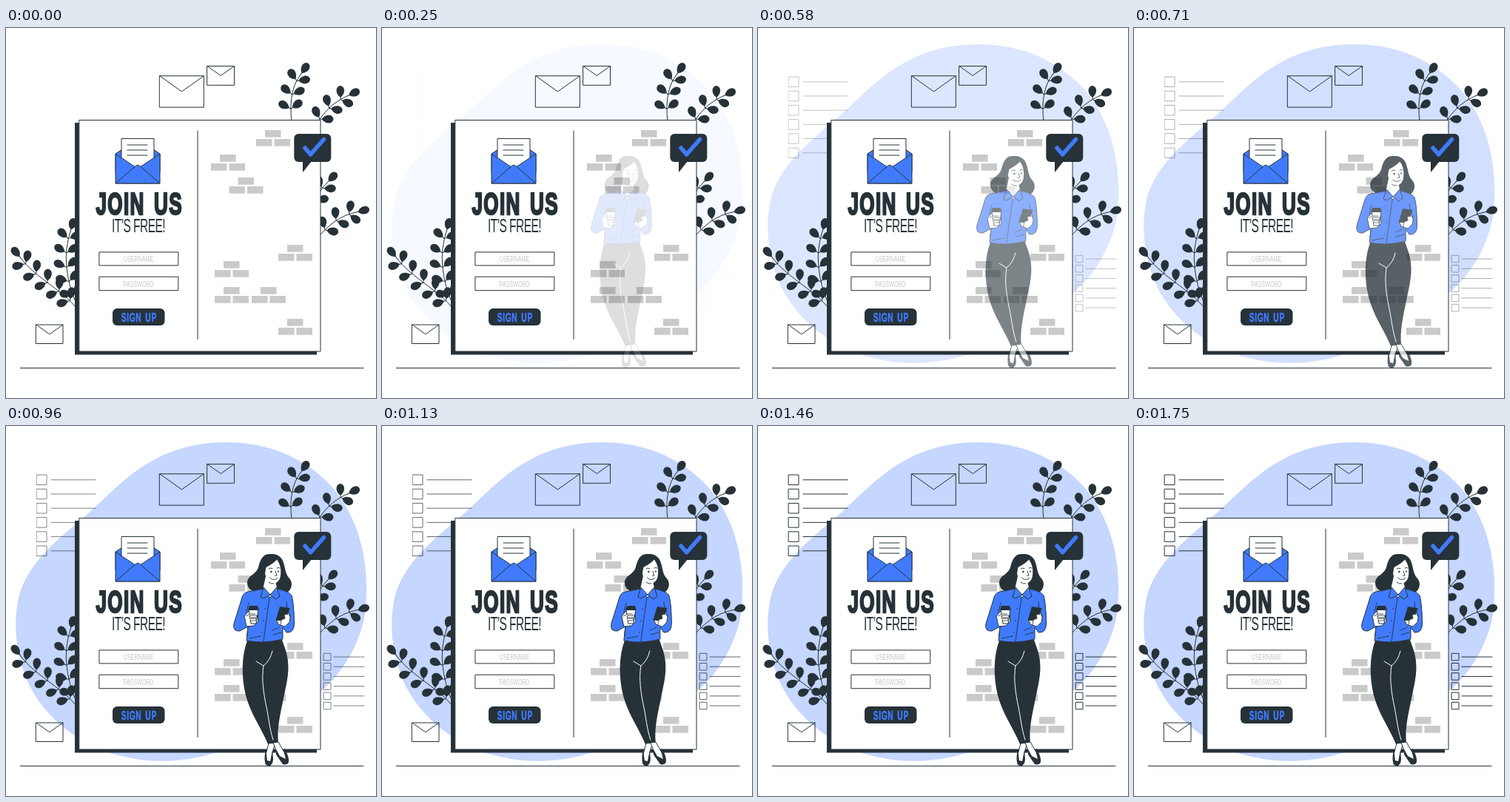
These frames come from a looping animation (500x500 px, 1790 ms). An HTML page:

```html
<!DOCTYPE html>
<html lang="en">
<head>
<meta charset="utf-8">
<title>Join us</title>
<style>
html, body { margin: 0; width: 100%; height: 100%; overflow: hidden; background: #fff; }
svg { display: block; width: 100%; height: 100%; }
.line { fill: none; stroke: #263238; stroke-linejoin: round; stroke-linecap: round; }
.edge { stroke: #263238; stroke-linejoin: round; }
.dark { fill: #263238; }
.blue { fill: #407bff; }
.white { fill: #fff; }
.brick { fill: #cacaca; }
.crease { fill: none; stroke: #fff; stroke-linecap: round; }
text { font-family: "Liberation Sans", Arial, sans-serif; text-anchor: middle; }
.bold { font-weight: 700; word-spacing: .14em; }
</style>
</head>
<body>
<svg viewBox="0 0 500 500">
  <path id="blob" fill="#c5d6ff" d="M298 22C380 22 445 67 470 130C487 170 490 215 485 255C477 300 450 340 422 361C390 387 340 416 300 435C265 450 215 458 170 449C105 438 52 396 29 345C14 308 9 270 17 232C28 187 68 155 102 126C147 90 190 22 298 22Z"/>
  <g id="lists" class="line"></g>
  <g id="plants"></g>
  <g id="mail" class="line"></g>
  <path class="line" d="M19.5 459.5H483"/>

  <path class="dark" d="M93 128H420V441.5H93Z"/>
  <path class="white edge" d="M98.8 124.5H425V437H98.8Z"/>
  <path class="line" d="M259 139V420.5"/>
  <g id="bricks" class="brick"></g>

  <g class="edge">
    <path class="blue" d="M148 170L178 150L208 170V195H148Z"/>
    <path class="white" d="M156 149.5H200V195H156Z"/>
    <path class="line" d="M164 158H191M164 165H191M164 172H191"/>
    <path class="blue" d="M148 170L178 190L208 170V210H148Z"/>
    <path class="blue" d="M148 210L174.5 187Q178 183.5 181.5 187L208 210Z"/>
  </g>

  <g class="white edge">
    <path d="M125.9 302.9H232.8V320.9H125.9Z"/>
    <path d="M125.9 336.2H232.8V354.7H125.9Z"/>
  </g>
  <rect class="dark" x="144" y="379" width="70.5" height="23" rx="6"/>
  <!-- one narrow face for all lettering -->
  <g id="words"></g>

  <g id="woman">
    <path class="dark" d="M357 173C347 172 343 182 341 191C338 201 326 202 326 212C326 221 336 227 347 222L378 226C387 222 388 211 383 206C376 199 378 189 373 180C369 174 363 172.500 357 173Z"/>
    <path class="white" d="M351 203L347 221L357 233L367 222L364 210Z"/>
    <path class="white" d="M351.5 191C355 189 361 186 366 180.500C371 187 372 195 371 202C370 209 366 212.500 362 212.300C355 211 351 206 350 199Z"/>
    <path class="line" stroke-width=".9" d="M355 193Q357 191 360 192.500M366 192Q368 190.500 370 192M364 196L366 202L363.500 202.500M356.500 205Q361 210 367 205.500M355 211Q358 214 362 213"/>
    <circle class="dark" cx="358.5" cy="197" r="1.2"/>
    <circle class="dark" cx="368" cy="196.5" r="1.1"/>

    <path class="dark" d="M326 290C318 311 318 340 324 364C330 388 345 408 354 430L368 428C366 411 370 392 374 373C378 352 383 336 381 318C380 306 376 298 373 289Z"/>
    <path class="crease" d="M360 304Q357 317 348 324L338 318M348 324C345 342 348 361 352 380C355 394 356 409 361 424"/>

    <path class="blue edge" d="M347 220L327 224Q320 225 318 235L308 267Q306 278 316 277L327 271L325 290Q348 295 374 288L374 272L379 279Q390 280 389.500 265Q389 239 386 229Q382 223 367 220L357 232Z"/>
    <path class="blue edge" d="M348 218L344 231L348 233L357 228ZM366 218L370 230L365 234L357 228Z"/>
    <path class="line" stroke-width=".9" d="M356 232Q352 260 348 291M328 239L325 252M327 271L326 283M379 238L380 246M329 287L344 284M361 282L372 279M369 272L360 276"/>
    <g class="dark"><circle cx="350" cy="247" r=".8"/><circle cx="348" cy="263" r=".8"/><circle cx="346" cy="279" r=".8"/></g>

    <path class="white edge" d="M322 257L328 250L340 252L341 264L335 270L325 271Z"/>
    <path class="white edge" d="M328 248H341L338 267H331Z"/>
    <path class="dark" d="M327.5 247L329 243H340L341.500 247V249H327.500Z"/>
    <path class="white edge" stroke-width=".8" d="M324 257L330 254L337 254M330 256H339V259H331M330 260H338V263H331"/>
    <path class="white edge" d="M365 261L371 254L382 251L384 257L383 265L377 271L368 268Z"/>
    <path class="dark" d="M370 244L383.500 246L378 264L364.500 262.500Z"/>
    <path class="white edge" stroke-width=".8" d="M376 255L382 254L384 258L383 265L377 271L371 269L372 262L377 260Z"/>

    <path class="white edge" d="M355 429L351 444L352 457L358 455L360 441L364 428Z"/>
    <path class="dark" d="M351 437Q348 451 351 458L356 459.500Q361 457 361 450L360 439L357 453L353 452Z"/>
    <path class="white edge" d="M361 428L366 441L374 455L380 454L376 441L368 427Z"/>
    <path class="dark" d="M376 435Q383 447 382 454Q380 459 374 457L365 444V437L370 446L378 450Z"/>
  </g>

  <path class="dark" d="M401 179V195L413 180Z"/>
  <rect class="dark" x="389.3" y="143" width="50" height="38" rx="6"/>
  <path fill="none" stroke="#407bff" stroke-width="5.5" stroke-linecap="round" stroke-linejoin="round" d="M404 162L411.500 171L429.500 150.500"/>
</svg>
<script>
const $ = id => document.getElementById(id);
const add = (id, tag, attrs) => {
  const el = document.createElementNS('http://www.w3.org/2000/svg', tag);
  for (const k in attrs) el.setAttribute(k, attrs[k]);
  return $(id).appendChild(el);
};

function list(x, y, size, step, from, to) {
  for (let i = 0; i < 6; i++) {
    const top = y + i * step;
    add('lists', 'path', { d: `M${x} ${top}h${size}v${size}h${-size}zM${from} ${top + size / 2}H${to}` });
  }
}
list(41.5, 66, 13.5, 19.2, 61, 121);
list(429.5, 307.3, 9.5, 13.2, 443, 484);

for (const [x, y, w, h] of [[207.7, 64.7, 59.6, 42.4], [272, 51.5, 36.5, 25.8], [40.7, 401, 36.3, 25.5]])
  add('mail', 'path', { d: `M${x} ${y}h${w}v${h}h${-w}zl${w / 2} ${h / 2}l${w / 2} ${-h / 2}` });

for (const [x, y] of [[338, 138], [277, 171], [301.5, 202], [368, 293], [282, 315], [282, 350], [332, 350], [368, 393]])
  for (const [dx, dy] of [[12, 0], [0, 12], [24.5, 12]])
    add('bricks', 'rect', { x: x + dx, y: y + dy, width: 21.5, height: 9.7 });

function word(label, x, y, size, color, spacing = 0, weight = 0) {
  const el = add('words', 'text', {
    transform: `translate(${x} ${y}) scale(.62 1)`, 'font-size': size, fill: color,
    'letter-spacing': spacing, stroke: weight ? color : 'none', 'stroke-width': weight
  });
  if (weight) el.setAttribute('class', 'bold');
  el.textContent = label;
}
word('JOIN US', 180.2, 251.8, 42, '#263238', 2.2, 2.6);
word('IT’S FREE!', 179, 275.6, 25, '#263238', -.9);
word('USERNAME', 179, 316.3, 11.5, '#c7c7c7');
word('PASSWORD', 179, 349.6, 11.5, '#c7c7c7');
word('SIGN UP', 179.8, 396.6, 16.5, '#407bff', 1.1, .6);

// Stem with a leaf at the tip and pairs below it
function branch(d) {
  const stem = add('plants', 'path', { d, class: 'line' }), length = stem.getTotalLength();
  const leaf = (s, turn) => {
    const p = stem.getPointAtLength(s), q = stem.getPointAtLength(s - 1);
    const angle = Math.atan2(p.y - q.y, p.x - q.x) * 180 / Math.PI + turn;
    add('plants', 'path', {
      class: 'dark', transform: `translate(${p.x} ${p.y}) rotate(${angle})`,
      d: 'M0-.5H3C7-7 17-8 18.500-1C18 6 9 7 3 .5H0Z'
    });
  };
  leaf(length, 0);
  for (let s = length - 10; s > 6; s -= 19.5) {
    leaf(s, -58);
    leaf(s, 58);
  }
}
[
  'M386 126Q381 85 398 63', 'M414 140Q432 104 461 92', 'M412 250Q420 222 434 209',
  'M416 290Q442 255 473 249', 'M96 375Q72 320 87 275', 'M97 381C80 356 40 338 20 311'
].forEach(branch);

const clamp = v => Math.max(0, Math.min(1, v));
const bezier = (a, b, s) => 3 * (1 - s) ** 2 * s * a + 3 * (1 - s) * s * s * b + s ** 3;

// cubic-bezier(.36, -.01, .5, 1.38)
function ease(x) {
  let lo = 0, hi = 1;
  for (let i = 0; i < 24; i++) {
    const mid = (lo + hi) / 2;
    if (bezier(.36, .5, mid) < x) lo = mid; else hi = mid;
  }
  return bezier(-.01, 1.38, hi);
}

function draw() {
  const t = performance.now() % 1790;
  const p = ease(clamp((t + 60) / 1500));
  const shown = t < 40 ? 0 : clamp(p);
  $('blob').style.opacity = $('woman').style.opacity = shown;
  $('lists').style.opacity = clamp((t - 230) / 1230);
  $('woman').setAttribute('transform', `translate(${30 * (p - 1)} 0)`);
  requestAnimationFrame(draw);
}
draw();
</script>
</body>
</html>
```
